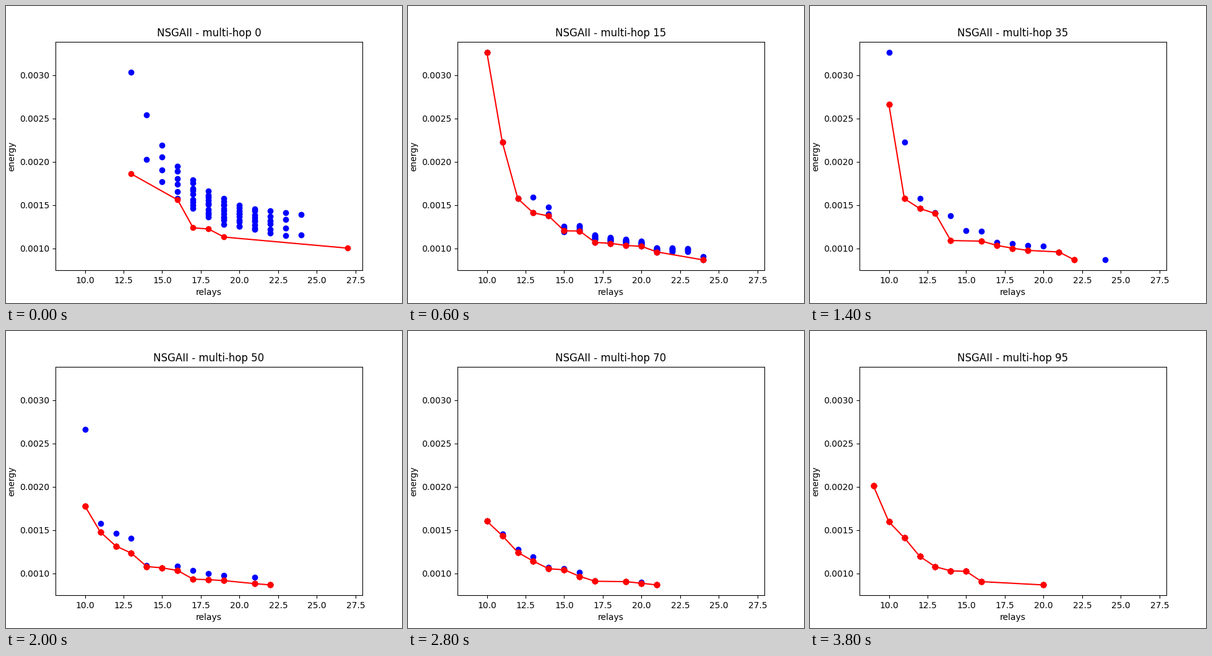
Animation of 640x480 px, one loop 4000 ms. Source, as a matplotlib script:

```python
import matplotlib.pyplot as plt
import numpy as np
from matplotlib.animation import FuncAnimation

FRAMES, INTERVAL, GEN_STEP = 20, 200, 5
RELAYS = np.arange(9, 28)
UNREACHED, LIMIT = 1e6, 4000  # energies in millionths
SETTLED = 15  # generation by which the random start has converged

# Key fronts: generation -> (first relays, last relays, best energies).
# Energies run over consecutive columns; the final one belongs to the last column.
KEYS = {
    0: (13, 27, [1861, 1861, 1861, 1561, 1239, 1225, 1132, 1004]),
    15: (10, 24, [3261, 2225, 1575, 1411, 1375, 1204, 1202, 1070, 1060, 1035, 1025, 960, 868]),
    35: (10, 22, [2661, 1575, 1461, 1404, 1092, 1092, 1085, 1035, 1003, 978, 978, 960, 868]),
    60: (10, 21, [1611, 1461, 1289, 1204, 1078, 1060, 1025, 915, 915, 906, 868]),
    95: (9, 20, [2011, 1596, 1411, 1197, 1078, 1031, 1025, 906, 868]),
}


def step_curve(first, last, energies):
    """Best energy within each number of relays, as a falling staircase."""
    *body, floor = energies
    curve = np.interp(RELAYS, first + np.arange(len(body)), body, left=UNREACHED)
    return np.where(RELAYS >= last, floor, curve)


CURVES = {gen: step_curve(*key) for gen, key in KEYS.items()}


def best_energy(gen):
    """Ease from the key front before gen to the one after it."""
    after = min(g for g in KEYS if g >= gen)
    before = max(g for g in KEYS if g <= gen)
    if before == after:
        return CURVES[gen]
    u = (gen - before) / (after - before)
    rest = (1 - u) ** 2
    return CURVES[after] + (CURVES[before] - CURVES[after]) * rest


def pareto(curve):
    points, best = [], LIMIT
    for r, e in zip(RELAYS, curve):
        if e < best:
            best = e
            points.append((r, e))
    return points


def start_cloud():
    """Random first members as (column, excess energy above the front)."""
    rng = np.random.default_rng(4)
    cloud = []
    for col, r in enumerate(RELAYS):
        if not 13 <= r <= 24:
            continue
        count = round(11 * np.exp(-((r - 19) / 4) ** 2))
        top = 1340 + 1680 * np.exp(-(r - 13) / 3)
        low = 1120 + 330 * np.exp(-(r - 17) / 3)
        energies = np.linspace(top, low, count) + rng.uniform(-15, 15, count)
        cloud += [(col, e - CURVES[0][col]) for e in energies]
    return cloud


CLOUD = start_cloud()


def dominated(gen):
    points = []
    if gen <= SETTLED:
        curve = best_energy(gen)
        shrink = np.exp(-gen / 8)
        points += [(RELAYS[c], curve[c] + extra * shrink) for c, extra in CLOUD]
    if gen >= SETTLED:
        # Survivors of an older front, which catches up towards the end.
        past = max(gen - (95 - gen) / 3, SETTLED)
        points += pareto(best_energy(past))
    return points


def scaled(points):
    return np.array(points, float) * (1, 1e-6)


fig, ax = plt.subplots(figsize=(6.4, 4.8), dpi=100)
members = ax.scatter([], [], color="blue")
elite = ax.scatter([], [], color="red")
line, = ax.plot([], [], color="red")
ax.set_xlim(8.098, 27.9475)
ax.set_ylim(0.000748, 0.003388)
ax.set_xlabel("relays")
ax.set_ylabel("energy")
title = ax.set_title("")


def update(i):
    gen = i * GEN_STEP
    front = scaled(pareto(best_energy(gen)))
    copies = 1 + min(gen // SETTLED, 4)  # several members share a front point
    members.set_offsets(scaled(dominated(gen)))
    elite.set_offsets(np.repeat(front, copies, axis=0))
    line.set_data(*front.T)
    title.set_text(f"NSGAII - multi-hop {gen}")
    return members, elite, line, title


anim = FuncAnimation(fig, update, frames=FRAMES, interval=INTERVAL, repeat=True)
plt.show()
```
